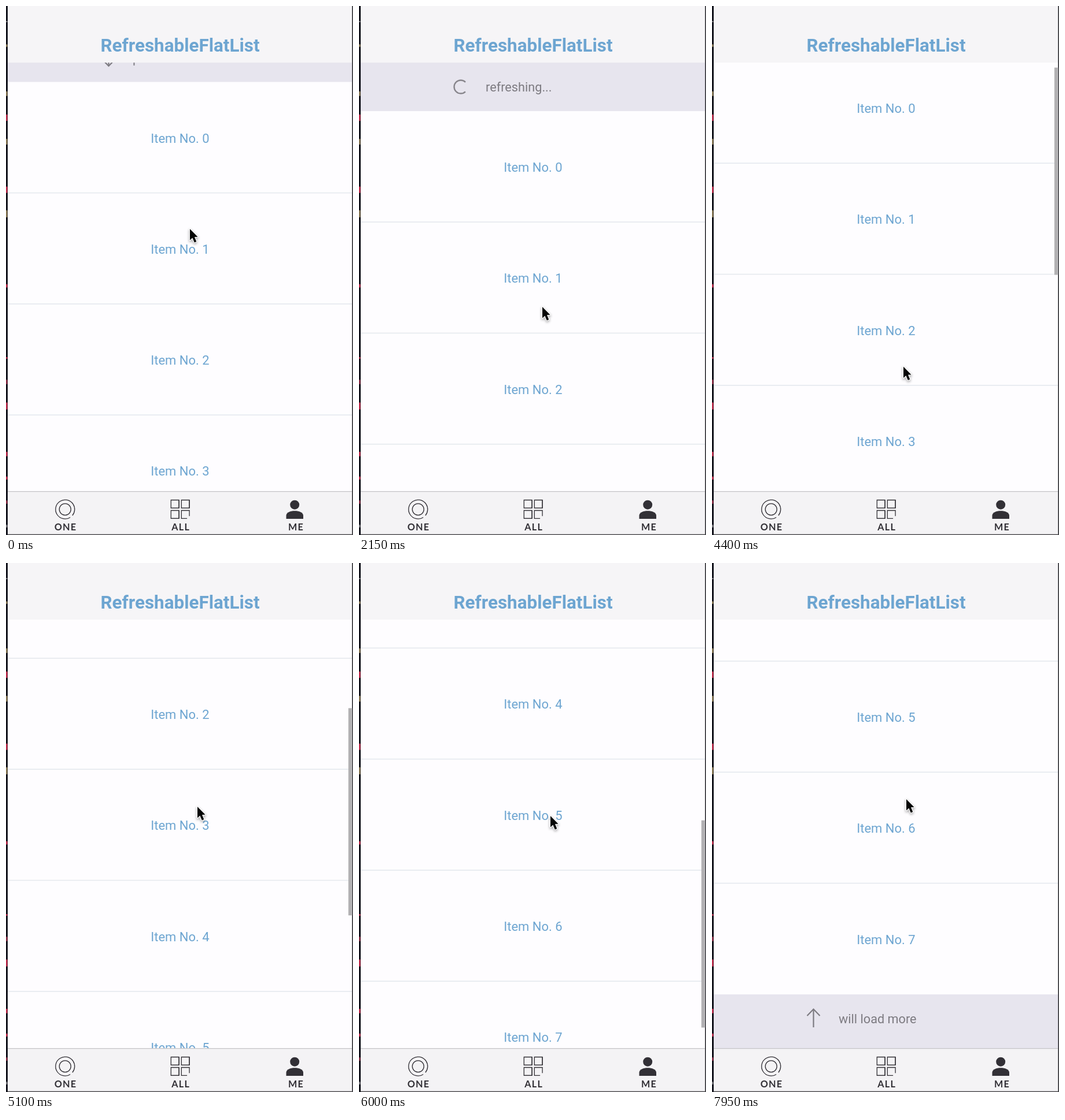
An HTML page with a canvas for the animation above (8000 ms loop, 600 by 916 pixels).

```html
<!DOCTYPE html>
<html lang="en">
<head>
<meta charset="utf-8">
<title>Refreshable list</title>
<style>
  html, body { margin: 0; width: 100%; height: 100%; overflow: hidden; background: #fefdff; }
  canvas { display: block; width: 600px; height: 916px; }
</style>
</head>
<body>
<canvas id="stage" width="600" height="916"></canvas>
<script>
const ctx = document.getElementById('stage').getContext('2d');
const LOOP = 8000, W = 600, H = 916;
const LEFT = 3, WIDTH = 595.4, TOP = 98, BOTTOM = 841, VIEW = BOTTOM - TOP;
const ITEM = 192.3, COUNT = 8, LENGTH = ITEM * COUNT, ROW = 84;
const BLUE = '#6da5d1', PANEL = '#e7e5ee', GREY = '#7d7b81', INK = '#323036';
const RELEASE = 1150, DONE = 3550, FLICK = 318;

const clamp = v => Math.max(0, Math.min(1, v));

// Progress from 0 to 1 between two times, eased at both ends
function ease(t, from, to) {
  const p = clamp((t - from) / (to - from));
  return p * p * (3 - 2 * p);
}

// Top of the list: pull, settle, close, two flicks, pull past the end
function listTop(t) {
  const rest = LENGTH - VIEW - FLICK;
  return TOP + 33.5
    + 97.5 * ease(t, 0, 850)
    - 47 * ease(t, RELEASE, 1450)
    - ROW * ease(t, DONE, 3900)
    - FLICK * ease(t, 4280, 5120)
    - rest * ease(t, 5250, 6254)
    - 94 * ease(t, 6900, 7850);
}

function cursorAt(t) {
  const x = 318 - 7 * ease(t, 0, 850) + 6 * ease(t, RELEASE, 1700)
    + 14 * ease(t, 3350, 4150) + 5 * ease(t, 6900, 7850);
  const y = 386 + 135 * ease(t, 0, 850) + 118 * ease(t, 3350, 4250)
    - 217 * ease(t, 4280, 5050)
    + 217 * ease(t, 5100, 5300) - 201 * ease(t, 5300, 5950)
    + 147 * ease(t, 6150, 6850) - 176 * ease(t, 6900, 7850);
  return [x, y];
}

function box(x, y, w, h, color) {
  ctx.fillStyle = color;
  ctx.fillRect(x, y, w, h);
}

function text(str, x, y, font, color, align = 'left') {
  ctx.font = font;
  ctx.fillStyle = color;
  ctx.textAlign = align;
  ctx.fillText(str, x, y);
}

function stroke(color, width) {
  ctx.strokeStyle = color;
  ctx.lineWidth = width;
  ctx.stroke();
}

function line(points, color, width) {
  ctx.beginPath();
  points.forEach(([x, y]) => ctx.lineTo(x, y));
  stroke(color, width);
}

function ring(x, y, r, from, to, color, width) {
  ctx.beginPath();
  ctx.arc(x, y, r, from, to);
  stroke(color, width);
}

// flip: 0 points up, 1 points down
function arrow(y, flip) {
  ctx.save();
  ctx.translate(176.5, y - 1);
  ctx.rotate(Math.PI * flip);
  line([[-1, 16], [-1, -15]], GREY, 2.2);
  line([[-12, -4], [-1, -15.5], [10, -4]], GREY, 2.2);
  ctx.restore();
}

function status(y, label) {
  text(label, 219, y + 8, '21.7px Roboto, sans-serif', GREY);
}

function drawPullRow(t, top) {
  const y = top - ROW / 2;
  box(LEFT, TOP, WIDTH, top - TOP, PANEL);
  if (t >= RELEASE && t < DONE) {
    const a = (t - RELEASE) / 1000 * Math.PI * 2;
    ring(176, y, 11.5, a + 0.8, a - 0.8, '#88868c', 2.4);
    status(y, 'refreshing...');
    return;
  }
  const ready = t < RELEASE && top > TOP + ROW;
  arrow(y, t < RELEASE ? 1 - ease(t, 425, 625) : 1);
  status(y, ready ? 'will refresh' : 'pull down to refresh');
}

function drawLoadRow(t, end) {
  const y = end + ROW / 2;
  box(LEFT, end, WIDTH, BOTTOM - end, PANEL);
  arrow(y, 1 - ease(t, 7550, 7750));
  status(y, BOTTOM - end > ROW ? 'will load more' : 'pull up to load more');
}

function drawList(t, top) {
  ctx.save();
  ctx.beginPath();
  ctx.rect(LEFT, TOP, WIDTH, VIEW);
  ctx.clip();
  if (top > TOP) drawPullRow(t, top);
  for (let i = 0; i < COUNT; i++) {
    const y = top + i * ITEM;
    text('Item No. ' + i, 301, y + 105, '22px Roboto, sans-serif', BLUE, 'center');
    if (i < COUNT - 1) box(LEFT, y + ITEM - 1, WIDTH, 1.6, '#e5e9ee');
  }
  if (top + LENGTH < BOTTOM) drawLoadRow(t, top + LENGTH);
  ctx.restore();
}

function drawThumb(t, top) {
  ctx.globalAlpha = ease(t, 4300, 4400) * (1 - ease(t, 6550, 6750));
  box(592, TOP + (TOP - top) * VIEW / LENGTH, 6.6, VIEW * VIEW / LENGTH, '#b3b2b4');
  ctx.globalAlpha = 1;
}

function drawTabs() {
  box(LEFT, BOTTOM, WIDTH, H - BOTTOM, '#f4f3f5');
  box(LEFT, BOTTOM - 1, WIDTH, 1.3, '#c6c5c9');

  ring(102.2, 871.6, 16.5, 1, 0.7, INK, 1.3);
  ring(102.2, 871.6, 10, 0, Math.PI * 2, INK, 1.3);

  // Four squares, the last one open at its corner
  const side = 13.8, gap = 18;
  for (let i = 0; i < 4; i++) {
    const x = 285.3 + (i % 2) * gap, y = 855.5 + (i >> 1) * gap;
    const cut = i === 3 ? 4 : 0;
    line([[x + side - cut, y + side], [x, y + side], [x, y], [x + side, y],
      [x + side, y + side - cut]], INK, 1.3);
    if (!cut) line([[x, y + side], [x + side, y + side], [x + side, y]], INK, 1.3);
  }

  ctx.fillStyle = INK;
  ctx.beginPath();
  ctx.arc(499.2, 863.7, 8, 0, Math.PI * 2);
  ctx.fill();
  ctx.beginPath();
  ctx.moveTo(484.5, 888);
  ctx.lineTo(484.5, 882);
  ctx.bezierCurveTo(485, 871.5, 513.5, 871.5, 514, 882);
  ctx.lineTo(514, 888);
  ctx.fill();

  ctx.letterSpacing = '1.2px';
  ['ONE', 'ALL', 'ME'].forEach((label, i) =>
    text(label, 103 + 199.2 * i, 908.3, 'bold 16.2px Lato, sans-serif', INK, 'center'));
  ctx.letterSpacing = '0px';
}

// Dark window edge with the ends of code lines showing
function drawEdges() {
  const tints = ['#c23050', '#c23050', '#8e3149', '#8a7b57', '#77777c'];
  let seed = 7;
  const random = () => (seed = seed * 16807 % 2147483647) / 2147483647;
  box(0, 0, LEFT, H, '#16171f');
  for (let y = 27; y < H; y += 41.6) {
    const h = 2 + 11 * random(), tint = tints[Math.floor(random() * tints.length)];
    if (random() < 0.75) box(0, y - h / 2, 2.5, h, tint);
  }
  box(LEFT + WIDTH, 0, W, H, '#2c2c31');
  box(LEFT, H - 1.4, W, 1.4, '#4a4a4d');
}

function drawCursor(x, y) {
  ctx.save();
  ctx.translate(x, y);
  ctx.beginPath();
  [[0, 0], [0, 19.5], [4.4, 15.4], [7.8, 23.4], [11.3, 21.9], [8, 14], [13.6, 13.8]]
    .forEach(([px, py]) => ctx.lineTo(px, py));
  ctx.closePath();
  ctx.lineJoin = 'round';
  ctx.shadowColor = 'rgba(0,0,0,.4)';
  ctx.shadowBlur = 4;
  ctx.shadowOffsetY = 2;
  stroke('#fff', 2.4);
  ctx.shadowColor = 'transparent';
  ctx.fillStyle = '#050505';
  ctx.fill();
  ctx.restore();
}

function draw(t) {
  const top = listTop(t);
  box(0, 0, W, H, '#fefdff');
  drawList(t, top);
  box(LEFT, 0, WIDTH, TOP, '#f6f5f7');
  text('RefreshableFlatList', 301, 78.5, 'bold 31.4px Roboto, sans-serif', BLUE, 'center');
  drawTabs();
  drawEdges();
  drawThumb(t, top);
  drawCursor(...cursorAt(t));
}

const start = performance.now();
function tick() {
  draw((performance.now() - start) % LOOP);
  requestAnimationFrame(tick);
}
tick();
</script>
</body>
</html>
```
